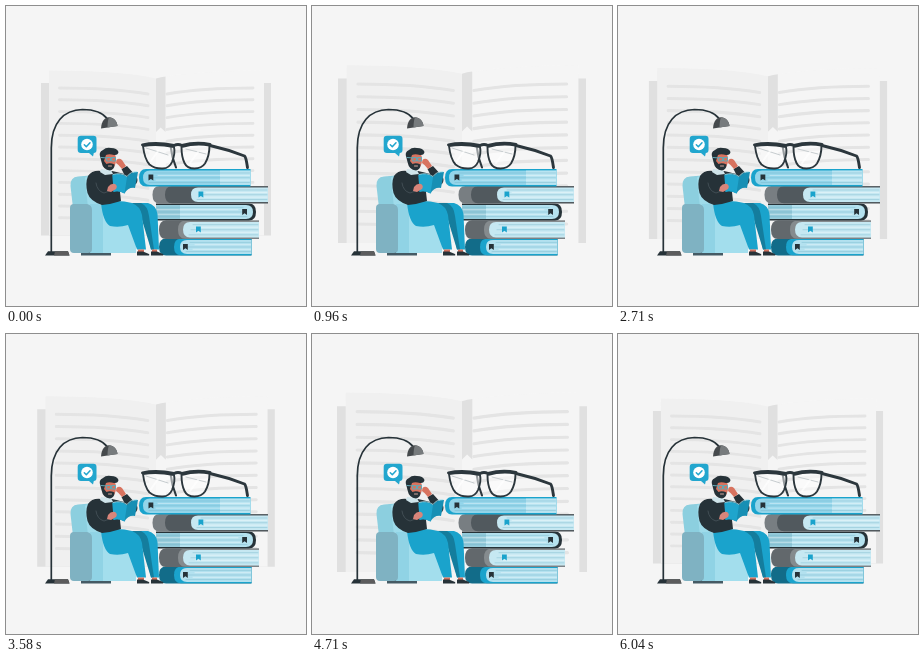
Animation, 300 px wide and 300 px high, one loop 6080 ms. Source, as an HTML page:

```html
<!DOCTYPE html>
<html lang="en">
<head>
<meta charset="utf-8">
<title>Reading corner</title>
<style>
  html, body { margin: 0; width: 100%; height: 100%; overflow: hidden; background: #f5f5f5; }
  svg { display: block; width: 100vw; height: 100vh; }
</style>
</head>
<body>
<svg viewBox="0 0 300 300" fill="none" stroke-linecap="round" stroke-linejoin="round">
  <g id="backdrop">
    <path fill="#e0e0e0" d="M35 77H265V229.500H35Z"/>
    <path fill="#f0f0f0" d="M43 64.500C84 65 121 66 150 72.500V229.500H43Z"/>
    <path fill="#f5f5f5" d="M258 64.500C220 65 182 66 150 72.500V229.500H258Z"/>
    <g id="text" stroke="#e4e4e4" stroke-width="2.900"/>
    <path fill="#e0e0e0" d="M150 72.500Q155 71 159.500 70.500V126L154.700 121.500L150 126Z"/>
  </g>

  <g id="lamp">
    <path stroke="#263238" stroke-width="1.700" d="M45.300 246V142C45.300 116 58 104 76.500 103.500C88.500 103.500 97 107 101.500 113"/>
    <path fill="#263238" d="M39 249.500L42 245.300H62L63.500 249.500Z"/>
    <path fill="#5c5c5d" d="M49 245.300H62L63.500 249.500H48Z"/>
    <path fill="#45494c" d="M95 122.500C95.500 115 99 111.300 103 111.300C107.500 111.500 111 115 111.500 120Z"/>
    <path fill="#777b7d" d="M103 111.300C107.500 111.500 111 115 111.500 120L101.500 121.500C101.500 117 102 114 103 111.300Z"/>
  </g>

  <g id="bubble">
    <path fill="#22a6ce" d="M75 129.800H87.500Q90.500 129.800 90.500 133V144Q90.500 147 87.800 147L87 150.500L83 147H75Q71.700 147 71.700 144V133Q71.700 129.800 75 129.800Z"/>
    <circle cx="81" cy="138.500" r="5.800" fill="#fff"/>
    <path stroke="#22a6ce" stroke-width="1.500" d="M78.300 138.700L80.300 140.700L84 136.700"/>
  </g>

  <g id="chair">
    <path fill="#455a64" d="M75 245H105V249.500H75Z"/>
    <path fill="#8ccfdf" d="M64.500 180Q64 171 72 170.500L84 169.500Q93 170 94 179L98 202H67Z"/>
    <path fill="#9edbea" d="M79 172Q80 169.500 84 169.500Q93 170 94 179L98 202H82Z"/>
    <path fill="#a3deed" d="M86 208Q97 203 130 207V247H86Z"/>
    <path fill="#90d3e5" d="M84 198H92Q97 199 97 205V247H84Z"/>
    <path fill="#7fb2c2" d="M68 198H81Q86 199 86 204V243Q86 247 82 247H68Q64 247 64 243V202Q64 198 68 198Z"/>
  </g>

  <g id="stack"></g>

  <g id="specs" stroke="#2c373d">
    <path stroke-width="2.100" d="M164.500 139.500L166.500 151L170 161.500"/>
    <path stroke="#8d999e" stroke-width="1" d="M140 142L162 149M180 143L200 148"/>
    <g fill="#fff" fill-opacity=".500" stroke-width="1.900">
      <path d="M137 140Q151 137.500 168 141Q169.500 147 166 156Q163.500 162 157 162.500Q149 163 143.500 158.500Q138.500 153 137 140Z"/>
      <path d="M175.500 141Q190 137 203.500 139.500Q203.500 150 199 157.500Q195.500 162.500 188.500 162.500Q181 162.500 178.500 157Q175.500 151 175.500 141Z"/>
    </g>
    <path stroke="#fff" stroke-width="2" opacity=".700" d="M145 155L152 145M184 157L192 146"/>
    <path stroke-width="2.900" d="M136.500 138.800Q151 136 168 139.500Q172 137.500 176 139.500Q190 135.700 204 138.500"/>
    <path stroke-width="2.900" d="M204 139.500Q222 143.500 238.500 150Q240 151 241.500 161.500"/>
  </g>

  <g id="reader">
    <path fill="#1aa3cc" d="M126 197L142 197Q150 199 151.500 208L153 243.500H145L138 212Z"/>
    <path fill="#147d9d" d="M126 197H135Q142 200 143 210L148 243.500H145L136 214Z"/>
    <path fill="#1aa3cc" d="M95 197Q111 193 126 197Q134 200 136 209L140 243.500H131L122 219Q113 222 104 220Q97 216 95 197Z"/>
    <path fill="#d06f5c" d="M132 243.500H138V246H132ZM146 243.500H151V246H146Z"/>
    <path fill="#263238" d="M131 245.500H137L143 248Q144 249.500 142 249.500H131ZM145 245.500H151L157 248Q158 249.500 156 249.500H145Z"/>
    <path fill="#263238" d="M95 165Q86 164 82 170Q79 177 81.500 187Q84 195 96 199Q106 198 115 195L114 186L118 175Q124 180 130 178Q133 174 130 170L121 160L115.500 163L118 168Q111 166 106 165Z"/>
    <path stroke="#536067" stroke-width=".600" d="M90 177Q91 185 98 187L106 184"/>
    <path fill="#cfe4ea" d="M95 163L105 164L107 168L99 169L94 166Z"/>
    <path fill="#d8735f" d="M96 150Q97 146 103 145.500Q110 146 110 153Q110 161 105 163.500Q99 164 96.500 158Z"/>
    <path fill="#263238" d="M94.500 152Q92 146 97 144Q100 141 105 142Q111 142 112.500 146Q112 149.500 108 149Q103 147.500 100 149L98 155L100.500 158Q104 156.500 108.500 158.500Q108.500 163.500 104 164.500Q97 164 95.500 156Z"/>
    <path stroke="#e8b5a9" stroke-width=".900" d="M102.500 160H105.500"/>
    <path stroke="#62a8b5" stroke-width="1" d="M95 151.500L101 152M101 151.500H104.500V155H101ZM106 151.500H109.500V155H106ZM104.500 152.500H106"/>
    <path fill="#d8735f" d="M110.500 154Q113 151.500 116 154L120 160L116 163L112.500 159L110 157Z"/>
    <path fill="#178fb4" d="M106.500 169Q114 166 121 171Q125 165.500 132 166L129 182Q122 181 118.500 187.500Q112 184 107.500 186Z"/>
    <path fill="#1fa5cd" d="M106.500 169Q114 166 121 171L118.500 187.500Q112 184 107.500 186Z"/>
    <path stroke="#a7e2ef" stroke-width=".800" d="M107 168.500Q115 166 121 170.500Q125 165 131 165.700"/>
    <path fill="#d8857a" d="M102 181Q105 177 109 178Q112 180 110 183L105 186L101 185Z"/>
  </g>
</svg>
<script>
  const $ = id => document.getElementById(id);

  // Curved text lines, mirrored across the fold.
  let lines = "";
  for (let i = 0; i < 12; i++) {
    const y = 82 + i * 11.8;
    lines += `<path d="M53.500 ${y}Q105 ${y} 142 ${y + 6}M247 ${y}Q196 ${y} 161 ${y + 6}"/>`;
  }
  $("text").innerHTML = lines;

  // A closed book seen from its page edge; the spine is the rounded end.
  function volume({ x, r, y, b, cover, ring, ringX, page, inner, lit, litX, litR, mark, markX, flip }) {
    const h = b - y, m = (y + b) / 2;
    const band = (a, inset, c) =>
      `<path d="M${r} ${y + inset}H${a + 7}Q${a} ${y + inset} ${a} ${m}Q${a} ${b - inset} ${a + 7} ${b - inset}H${r}Z" fill="${c}"/>`;
    let s = band(x, 0, cover);
    if (ring) s += band(ringX, .3, ring);
    s += band(inner, 1.6, page);
    if (lit) s += `<path d="M${litX} ${y + 1.6}H${litR}V${b - 1.6}H${litX}Z" fill="${lit}"/>`;
    for (let j = 1; j < 6; j++) {
      const ly = y + 1.6 + j * (h - 3.2) / 6;
      s += `<path d="M${inner + 5 + j * 5 % 12} ${ly}H${r - 1}" stroke="${j % 2 ? "#74b4c8" : "#fff"}" stroke-width=".600" opacity=".700"/>`;
    }
    s += `<path d="M${markX} ${m - h * .18}h4.800v6l-2.400-1.700l-2.400 1.700Z" fill="${mark}"/>`;
    return flip ? `<g transform="translate(${x + r} 0) scale(-1 1)">${s}</g>` : s;
  }

  const ink = "#263238", teal = "#1aa3cc", sky = "#93d5ea", pale = "#c6e8f2";
  $("stack").innerHTML = [
    { x: 153, r: 245.5, y: 232.5, b: 249.5, cover: "#126c89", ring: teal, ringX: 168, page: "#b3e1ef", inner: 174, mark: ink, markX: 177 },
    { x: 153, r: 253, y: 214.5, b: 233, cover: "#62686c", ring: "#858b8e", ringX: 172, page: pale, inner: 177, mark: teal, markX: 190 },
    { x: 150, r: 250, y: 197.5, b: 214.5, cover: ink, page: "#b5e2ef", inner: 153, lit: "#92c9d9", litX: 226, litR: 250, mark: ink, markX: 159, flip: true },
    { x: 146.5, r: 262, y: 180, b: 197.5, cover: "#787e82", ring: "#51595e", ringX: 159, page: pale, inner: 185, mark: teal, markX: 192.5 },
    { x: 133, r: 244.5, y: 163, b: 180.5, cover: teal, page: sky, inner: 137, lit: "#b9e4f1", litX: 214, litR: 244.5, mark: ink, markX: 142.5 }
  ].map(volume).join("");

  // Half width of the backdrop book over the loop: [ms, px].
  const LOOP = 6080;
  const keys = [
    [0, 115], [630, 121], [960, 124], [1350, 125.2], [1750, 123.2], [2290, 120.8],
    [2710, 119.1], [3300, 118.6], [4170, 120.2], [4710, 125], [4870, 125.3],
    [5540, 119], [LOOP, 115]
  ];

  function slope(i) {
    if (!i || i === keys.length - 1) return 0;
    const [a, k, b] = [keys[i - 1], keys[i], keys[i + 1]];
    const p = (k[1] - a[1]) / (k[0] - a[0]), q = (b[1] - k[1]) / (b[0] - k[0]);
    return p * q > 0 ? 2 * p * q / (p + q) : 0;
  }

  function halfWidth(t) {
    const i = keys.findIndex(k => k[0] > t) - 1;
    const [t0, v0] = keys[i], [t1, v1] = keys[i + 1];
    const d = t1 - t0, u = (t - t0) / d, w = 1 - u;
    return v0 * (1 + 2 * u) * w * w + slope(i) * d * u * w * w
      + v1 * u * u * (3 - 2 * u) - slope(i + 1) * d * u * u * w;
  }

  function draw(t) {
    const s = halfWidth(t % LOOP) / 115;
    $("backdrop").setAttribute("transform", `translate(150 133) scale(${s}) translate(-150 -133)`);
  }

  const start = performance.now();
  function tick() {
    draw(performance.now() - start);
    requestAnimationFrame(tick);
  }
  tick();
</script>
</body>
</html>
```
